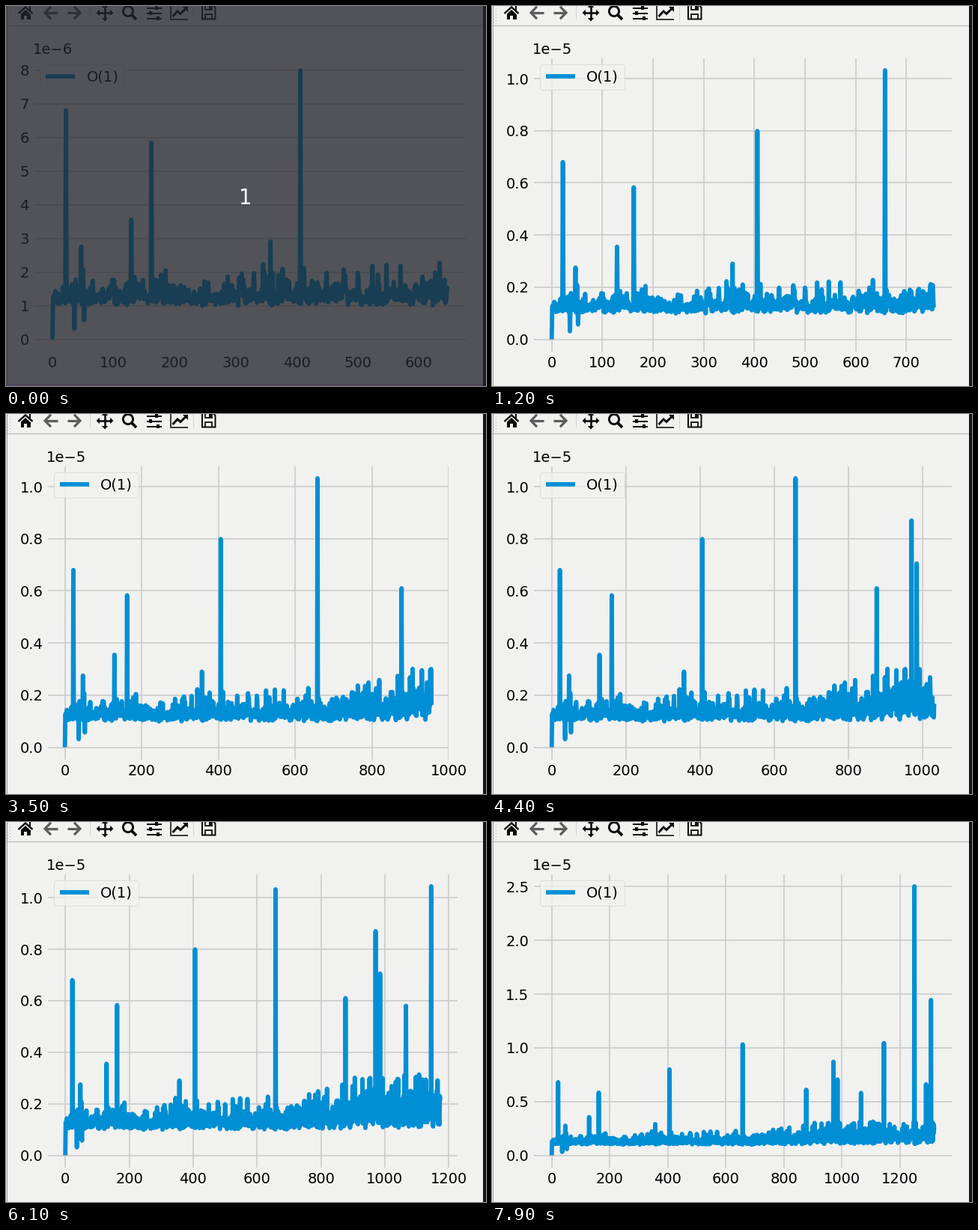
These frames come from a looping animation (641x508 px, 8000 ms). A matplotlib script:

```python
import numpy as np
import matplotlib.pyplot as plt
from matplotlib.animation import FuncAnimation
from matplotlib.patches import Circle, Polygon, Rectangle

BG, INK, DIM, PALE = "#f1f1ef", "#0c0c0c", "#5c5c5c", "#d2d2d2"
plt.style.use("fivethirtyeight")
plt.rcParams.update({
    "figure.facecolor": BG, "axes.facecolor": BG, "axes.edgecolor": BG,
    "lines.linewidth": 4.2, "grid.linewidth": 1.2,
})

W, H, DPI = 641, 508, 100
FRAMES, INTERVAL = 80, 100
TOP, BOTTOM, RIGHT = 68, 463.5, 616
DIGIT = 0.636 * 14 * DPI / 72  # width of one tick label digit in pixels

# The few slow calls that shape the chart, in microseconds
SPIKES = {22: 6.8, 47: 2.75, 129: 3.55, 162: 5.83, 357: 2.9, 406: 7.99,
          658: 10.32, 877: 6.1, 971: 8.7, 985: 7.05, 1066: 5.8,
          1145: 10.44, 1250: 25.03, 1290: 6.6, 1307: 14.45}


def make_samples(count=1330):
    """Skewed noise that spreads out later on, plus the spikes."""
    rng = np.random.default_rng(7)
    x = np.arange(count)
    grow = np.clip((x - 680) / 260, 0, 1)
    noise = 0.97 + rng.gamma(2.8, 0.14 + 0.14 * grow)
    y = np.minimum(noise, 2 + 0.9 * grow + 0.3 * rng.random(count))
    y[list(SPIKES)] = list(SPIKES.values())
    y[0], y[36], y[52] = 0, 0.31, 0.57
    return x, y * 1e-6


def sample_count(k):
    return round(647 + 9.05 * k - 0.007 * k * k)


xs, ys = make_samples()
fig = plt.figure(figsize=(W / DPI, H / DPI), dpi=DPI)

# Chart
ax = fig.add_axes([0.1, 0.1, 0.8, 0.8])
curve, = ax.plot([], [], label="O(1)")
ax.legend(loc="upper left")

# Window chrome, in pixels from the top left
ui = fig.add_axes([0, 0, 1, 1], zorder=5)
ui.set(xlim=(0, W), ylim=(H, 0))
ui.axis("off")


def stroke(points, width, color=INK):
    px, py = zip(*points)
    ui.plot(px, py, color=color, lw=width * 72 / DPI,
            solid_joinstyle="miter")


def shape(points):
    ui.add_patch(Polygon(points, fc=INK, lw=0))


def box(x, y, w, h, color=INK, **kw):
    return ui.add_patch(Rectangle((x, y), w, h, fc=color, lw=0, **kw))


def draw_home(cx):
    stroke([(cx - 9.5, 10), (cx, 1.5), (cx + 9.5, 10)], 2.4)
    box(cx + 4.5, 0, 2.6, 6)
    shape([(cx - 6.5, 11), (cx, 5), (cx + 6.5, 11)])
    for side in (-6.5, 2):
        box(cx + side, 11, 4.5, 7)
    box(cx - 2, 10.8, 4, 2.2)


def draw_arrow(cx, d):
    stroke([(cx + 9 * d, 9), (cx - 7 * d, 9)], 3.2, DIM)
    stroke([(cx, 0.8), (cx - 8 * d, 9), (cx, 17.2)], 3.2, DIM)


def draw_pan(cx, cy):
    for dx, dy in ((1, 0), (-1, 0), (0, 1), (0, -1)):
        stroke([(cx, cy), (cx + 8 * dx, cy + 8 * dy)], 2.6)
        bx, by = cx + 7 * dx, cy + 7 * dy
        shape([(cx + 11.5 * dx, cy + 11.5 * dy),
               (bx + 4.2 * dy, by + 4.2 * dx), (bx - 4.2 * dy, by - 4.2 * dx)])


def draw_zoom(cx, cy):
    ui.add_patch(Circle((cx, cy), 6.6, fill=False, ec=INK, lw=2.1))
    stroke([(cx + 4.5, cy + 4.5), (cx + 11, cy + 11)], 3.8)


def draw_sliders(x):
    for i, knob in enumerate((11, 3, 13)):
        y = 2.5 + 7 * i
        stroke([(x, y), (x + 20, y)], 2)
        box(x + knob, y - 2.7, 4, 5.4)


def draw_plot(x):
    stroke([(x, -2), (x, 17.8), (x + 23, 17.8)], 1.6)
    stroke([(x + 2.5, 14), (x + 9, 7), (x + 13, 10.5), (x + 20, 3.5)], 3)
    shape([(x + 15.5, 1), (x + 22.5, 1), (x + 22.5, 8)])


def draw_save(x):
    stroke([(x, -2), (x, 17.5), (x + 17.5, 17.5), (x + 17.5, 2),
            (x + 14, -2)], 2)
    for y0, y1 in ((-1, 5), (17, 11)):
        stroke([(x + 4, y0), (x + 4, y1), (x + 13, y1), (x + 13, y0)], 1.8)
    box(x + 9, 0, 2.5, 4)


for y in range(1, 22, 4):
    box(2, y, 1, 1, "#b4b4b4")
    box(5, y + 2, 1, 1, "#b4b4b4")
for x in (112, 250):
    stroke([(x, 0), (x, 19)], 1, PALE)
draw_home(26)
draw_arrow(60, 1)
draw_arrow(91, -1)
draw_pan(132, 9)
draw_zoom(163, 7)
draw_sliders(188)
draw_plot(220)
draw_save(262)

stroke([(0, 26), (637, 26)], 1.4, "#bdbdbd")
stroke([(0.5, 0), (0.5, H)], 1, "#a0a0a0")
box(637, 0, 4, H, "#161616", zorder=4)

# Countdown veil
veil = [
    box(0, 0, W, H, (0.13, 0.142, 0.168), alpha=0.77, zorder=10),
    box(0, 505, 637, 3, "#50485a", zorder=11),
    ui.text(320, 265, "1", color="white", fontsize=19.8, ha="center",
            va="baseline", zorder=12),
]


def place_axes(left, right):
    ax.set_position([left / W, 1 - BOTTOM / H,
                     (right - left) / W, (BOTTOM - TOP) / H])


def draw(k):
    n = sample_count(k)
    curve.set_data(xs[:n + 1], ys[:n + 1])
    peak = ys[:n + 1].max()
    lo, hi = -0.05 * n, 1.05 * n
    ax.set(xlim=(lo, hi), ylim=(-0.05 * peak, 1.05 * peak))

    # One-digit labels need less room on the left
    left = 54.2 if peak > 1e-5 else 54.2 - 1.5 * DIGIT
    place_axes(left, RIGHT)

    # Pull the right edge in when the last tick label would overflow
    last = max(t for t in ax.get_xticks() if t <= hi)
    half = len(str(int(last))) * DIGIT / 2
    share = (last - lo) / (hi - lo)
    place_axes(left, min(RIGHT, left + (RIGHT - half - left) / share))

    # The veil swallows the faint vertical lines
    ax.grid(k > 0, axis="x")
    for artist in veil:
        artist.set_visible(k == 0)
    return [curve, *veil]


anim = FuncAnimation(fig, draw, frames=FRAMES, interval=INTERVAL,
                     repeat=True, repeat_delay=0, blit=False)
plt.show()
```
